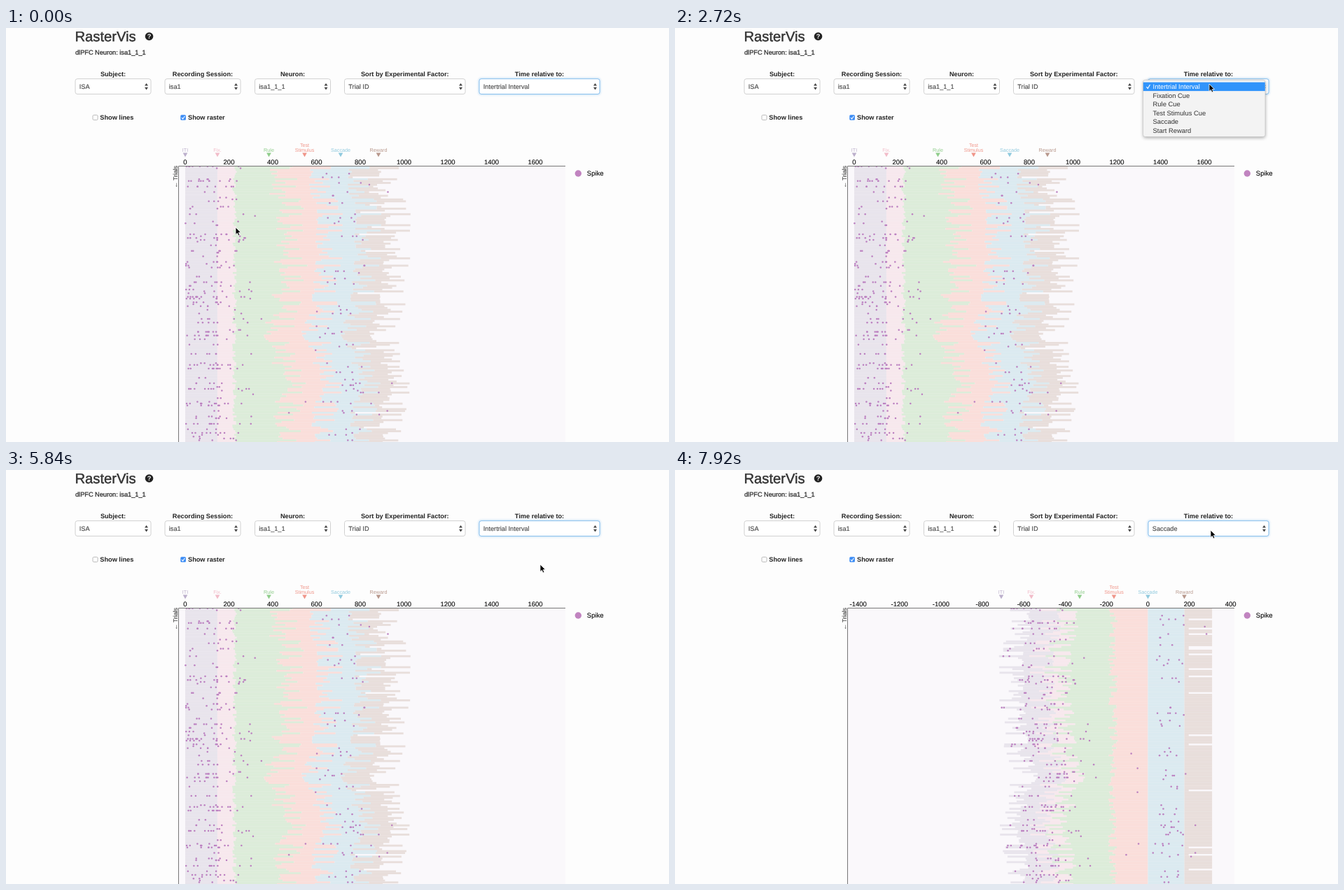
These frames come from a looping animation (947x592 px, 8 s). An HTML page with a canvas:

```html
<!DOCTYPE html>
<html lang="en">
<head>
<meta charset="utf-8">
<title>RasterVis</title>
<style>
  html, body { margin: 0; width: 100%; height: 100%; overflow: hidden; background: #fdfdfd; }
  canvas, svg { position: absolute; left: 0; top: 0; width: 947px; height: 592px; }
  text { font-family: "Liberation Sans", Arial, sans-serif; font-size: 9.2px; fill: #333; text-rendering: geometricPrecision; }
  .bold { font-weight: bold; fill: #222; }
  .medium { stroke: #333; stroke-width: .3px; }
  .mid { text-anchor: middle; }
  .value { fill: #444; stroke: #444; stroke-width: .12px; }
  .tick { font-size: 9.5px; fill: #111; stroke: #111; stroke-width: .15px; text-anchor: middle; }
  .event { font-size: 7.2px; text-anchor: middle; }
  #menu text { font-size: 9.4px; }
</style>
</head>
<body>
<canvas id="raster" width="947" height="592"></canvas>
<svg viewBox="0 0 947 592">
  <defs>
    <filter id="glow" x="-10%" y="-50%" width="120%" height="200%"><feGaussianBlur stdDeviation="1.6"/></filter>
    <filter id="shade" x="-10%" y="-20%" width="120%" height="140%"><feGaussianBlur stdDeviation="2.5"/></filter>
  </defs>

  <text x="98.5" y="19" class="medium" style="font-size:20.2px;stroke-width:.45px">RasterVis</text>
  <circle cx="204.5" cy="12" r="5.8" fill="#222"/>
  <text x="204.5" y="15.3" class="bold mid" style="fill:#fff">?</text>
  <text x="99" y="38" class="medium">dlPFC Neuron: isa1_1_1</text>

  <g id="selects"></g>

  <rect x="124" y="124.5" width="7" height="7" rx="1.5" fill="#fff" stroke="#aaa" stroke-width=".8"/>
  <text x="134.3" y="131" class="bold">Show lines</text>
  <rect x="249.3" y="124.2" width="7.6" height="7.6" rx="1.5" fill="#3b8cf5"/>
  <path d="M251 128.2l1.6 1.8 2.8-4" fill="none" stroke="#fff" stroke-width="1.1"/>
  <text x="260" y="131" class="bold">Show raster</text>

  <g id="events"></g>
  <g id="ticks"></g>
  <path d="M246.5 592V197.5H799" fill="none" stroke="#777"/>
  <text transform="translate(244.5 197) rotate(-90)" text-anchor="end" class="value" style="font-size:8.7px">← Trials</text>
  <circle cx="817.3" cy="208" r="4.7" fill="#c184c0"/>
  <text x="829.8" y="210.6" class="tick" style="text-anchor:start">Spike</text>

  <g id="menu">
    <rect x="669" y="76" width="174" height="81" rx="3" opacity=".35" filter="url(#shade)"/>
    <rect x="668.5" y="74.5" width="174.5" height="81" rx="3" fill="#f3f3f3" stroke="#c4c4c4" stroke-width=".7"/>
    <rect id="hot" x="668.8" width="174" height="12.5" fill="#3194fb"/>
    <path id="check" d="M673.5 84.2l1.8 2.4 3.2-5.6" fill="none" stroke-width="1.1"/>
    <g id="items"></g>
  </g>
  <path id="cursor" d="M0 0V10.4L2.4 8.3 4 12 5.9 11.2 4.3 7.6H7.5Z" fill="#000" stroke="#fff" stroke-width=".8"/>
</svg>

<script>
const LOOP = 8000, STEP = 40;
const TOP = 197.75, PITCH = 2.63, ROWS = 151;
const K1 = 0.3125, X1 = 256, K2 = 0.2956, X2 = 675.5;
const BANDS = ['#e8e4ec', '#f7e8ed', '#dcecd9', '#fadeda', '#dbeaf0', '#e8dedb'];

const $ = id => document.getElementById(id);
const lerp = (a, b, p) => a + (b - a) * p;
const clamp = v => Math.max(0, Math.min(1, v));
const smooth = p => p * p * (3 - 2 * p);
const easeInOut = p => p < .5 ? 4 * p ** 3 : 1 - (2 - 2 * p) ** 3 / 2;

function add(parent, tag, attrs, text) {
  const el = document.createElementNS('http://www.w3.org/2000/svg', tag);
  for (const k in attrs) el.setAttribute(k, attrs[k]);
  if (text !== undefined) el.textContent = text;
  return parent.appendChild(el);
}

// Smooth curve through [position, ...values] keys
function follow(keys, at) {
  const i = Math.max(1, keys.findIndex(k => at <= k[0]));
  const [a, b] = [keys[i - 1], keys[i]];
  const p = smooth((at - a[0]) / (b[0] - a[0]));
  return a.slice(1).map((v, n) => lerp(v, b[n + 1], p));
}

let seed = 41;
function rnd() {
  seed = (seed + 0x6d2b79f5) | 0;
  let h = Math.imul(seed ^ seed >>> 15, 1 | seed);
  h = h + Math.imul(h ^ h >>> 7, 61 | h) ^ h;
  return ((h ^ h >>> 14) >>> 0) / 4294967296;
}
const spread = (lo, hi) => lerp(lo, hi, rnd());

// Drop-downs: label, value, left, right
const selects = [
  ['Subject:', 'ISA', 99, 207], ['Recording Session:', 'isa1', 227, 335],
  ['Neuron:', 'isa1_1_1', 355.5, 463.5], ['Sort by Experimental Factor:', 'Trial ID', 483.5, 656],
  ['Time relative to:', '', 676, 848]
];
let choice;
selects.forEach(([label, value, l, r], i) => {
  const g = $('selects'), focus = i === 4;
  const box = { x: l, y: 72.7, width: r - l, height: 21.8, rx: 3 };
  add(g, 'text', { x: (l + r) / 2, y: 69, class: 'bold mid' }, label);
  if (focus) add(g, 'rect', { ...box, fill: 'none', stroke: '#66afe9', 'stroke-width': 2, opacity: .5, filter: 'url(#glow)' });
  add(g, 'rect', { ...box, fill: '#fff', stroke: focus ? '#7ebaec' : '#ccc', 'stroke-width': .9 });
  choice = add(g, 'text', { x: l + 5.8, y: 87, class: 'value' }, value);
  add(g, 'path', { d: `M${r - 9} 82.6h5l-2.5 -3.6zM${r - 9} 84.8h5l-2.5 3.6z`, fill: '#444' });
});

const items = ['Intertrial Interval', 'Fixation Cue', 'Rule Cue', 'Test Stimulus Cue', 'Saccade', 'Start Reward']
  .map((s, i) => add($('items'), 'text', { x: 682.6, y: 87.1 + 12.5 * i }, s));

// Event markers: label lines, colour, x on each alignment
const events = [
  [['ITI'], '#bcb0cc', 256, 466], [['Fix.'], '#f2bcc9', 302, 509],
  [['Rule'], '#8fcd8b', 375.5, 578], [['Test', 'Stimulus'], '#f0968a', 426.5, 627],
  [['Saccade'], '#90cade', 478, 675.5], [['Reward'], '#b8988c', 532, 727.5]
].map(([lines, fill, a, b]) => {
  const g = add($('events'), 'g', { fill });
  lines.forEach((s, i) => add(g, 'text', { class: 'event', style: `fill:${fill}`, y: 177 - 7.4 * (lines.length - 1 - i) }, s));
  add(g, 'path', { d: 'M-3.3 178.5h6.6l-3.3 6z' });
  return { g, a, b };
});

const ticks = [];
for (let v = -1400; v <= 1600; v += 200)
  ticks.push({ v, el: add($('ticks'), 'text', { y: 194.8, class: 'tick' }, v) });

// Typical saccade time drifts slowly down the trials: row, ms
const drift = [[0, 600], [10, 590], [30, 628], [50, 622], [77, 605], [88, 556], [104, 600], [120, 655], [134, 598], [151, 620]];

const trials = Array.from({ length: ROWS }, (_, row) => {
  const sac = follow(drift, row)[0] - 28 + 130 * rnd() ** 2;
  const rule = spread(214, 236);
  const stim = sac - spread(145, 192);
  const end = sac + (rnd() < .1 ? 197 : 310);
  return { sac, cuts: [0, 147, rule, stim, sac, sac + 176, end] };
});

// Firing is dense before the rule cue, then bursts again after the saccade
const spikes = [];
trials.forEach(({ sac, cuts }, row) => {
  const fire = (n, time) => { while (n-- > 0) spikes.push({ row, t: time() }); };
  const early = rnd() < .5 ? Math.ceil(1 + 11 * rnd() ** 2.2) : 0;
  const late = rnd() < .36 ? Math.ceil(4 * rnd() ** 1.6) : 0;
  fire(early, () => rnd() < .62 ? spread(0, 150) : 140 + 165 * rnd() ** 1.5);
  fire(late, () => sac + (rnd() < .8 ? spread(55, 175) : spread(-60, 300)));
  if (rnd() < .05) fire(1, () => spread(300, cuts[4]));
});

const ctx = $('raster').getContext('2d');
function drawRaster(p) {
  const at = (t, sac) => lerp(X1 + K1 * t, X2 + K2 * (t - sac), p);
  ctx.clearRect(0, 0, 947, 592);
  ctx.save();
  ctx.beginPath();
  ctx.rect(246, 197, 553, 395);
  ctx.clip();
  ctx.fillStyle = '#faf8fb';
  ctx.fillRect(246, 197, 553, 395);
  trials.forEach(({ sac, cuts }, i) => {
    const y = TOP + PITCH * (i - .5);
    BANDS.forEach((c, k) => {
      const x = at(cuts[k], sac);
      ctx.fillStyle = c;
      ctx.fillRect(x, y, at(cuts[k + 1], sac) - x, PITCH + .2);
    });
  });
  ctx.fillStyle = '#bb7fc0';
  for (const { row, t } of spikes) {
    ctx.beginPath();
    ctx.arc(at(t, trials[row].sac), TOP + PITCH * row, 1.25, 0, 7);
    ctx.fill();
  }
  ctx.restore();
}

function align(p) {
  drawRaster(p);
  for (const { g, a, b } of events) g.setAttribute('transform', `translate(${lerp(a, b, p)} 0)`);
  for (const { v, el } of ticks) {
    el.setAttribute('x', lerp(X1 + K1 * v, X2 + K2 * v, p));
    el.setAttribute('opacity', lerp(v >= 0 ? 1 : 0, v <= 400 ? 1 : 0, p));
  }
}

// Pointer: time, x, y
const path = [[0, 328, 285], [400, 328, 285], [640, 672, 134], [880, 672, 134], [1040, 750, 101], [1600, 750, 101],
  [2000, 763, 80], [2800, 763, 80], [3160, 763, 95], [3200, 763, 95], [3560, 763, 135], [6760, 763, 135],
  [7160, 700, 516], [7560, 715, 316], [7600, 715, 316], [7880, 765, 86], [LOOP, 765, 86]];

let shown = -1;
function render(t) {
  const [x, y] = follow(path, t);
  $('cursor').setAttribute('transform', `translate(${x} ${y})`);

  const open = t >= 2360 ? 1 - clamp((t - 4240) / 120) : 0;
  $('menu').setAttribute('opacity', open);
  if (open) {
    const blink = t >= 4200 && t < 4240;
    const hot = blink ? -1 : Math.floor((y - 77.6) / 12.5);
    $('hot').setAttribute('y', 77.6 + 12.5 * hot);
    $('hot').setAttribute('opacity', blink ? 0 : 1);
    $('check').setAttribute('stroke', hot === 0 ? '#fff' : '#333');
    items.forEach((el, i) => { el.style.fill = i === hot ? '#fff' : '#333'; });
  }

  choice.textContent = t < 6160 ? 'Intertrial Interval' : 'Saccade';
  const p = easeInOut(clamp((t - 6140) / 220));
  if (p !== shown) align(shown = p);
}

function frame() {
  render(Math.floor(performance.now() % LOOP / STEP) * STEP);
  requestAnimationFrame(frame);
}
frame();
</script>
</body>
</html>
```
